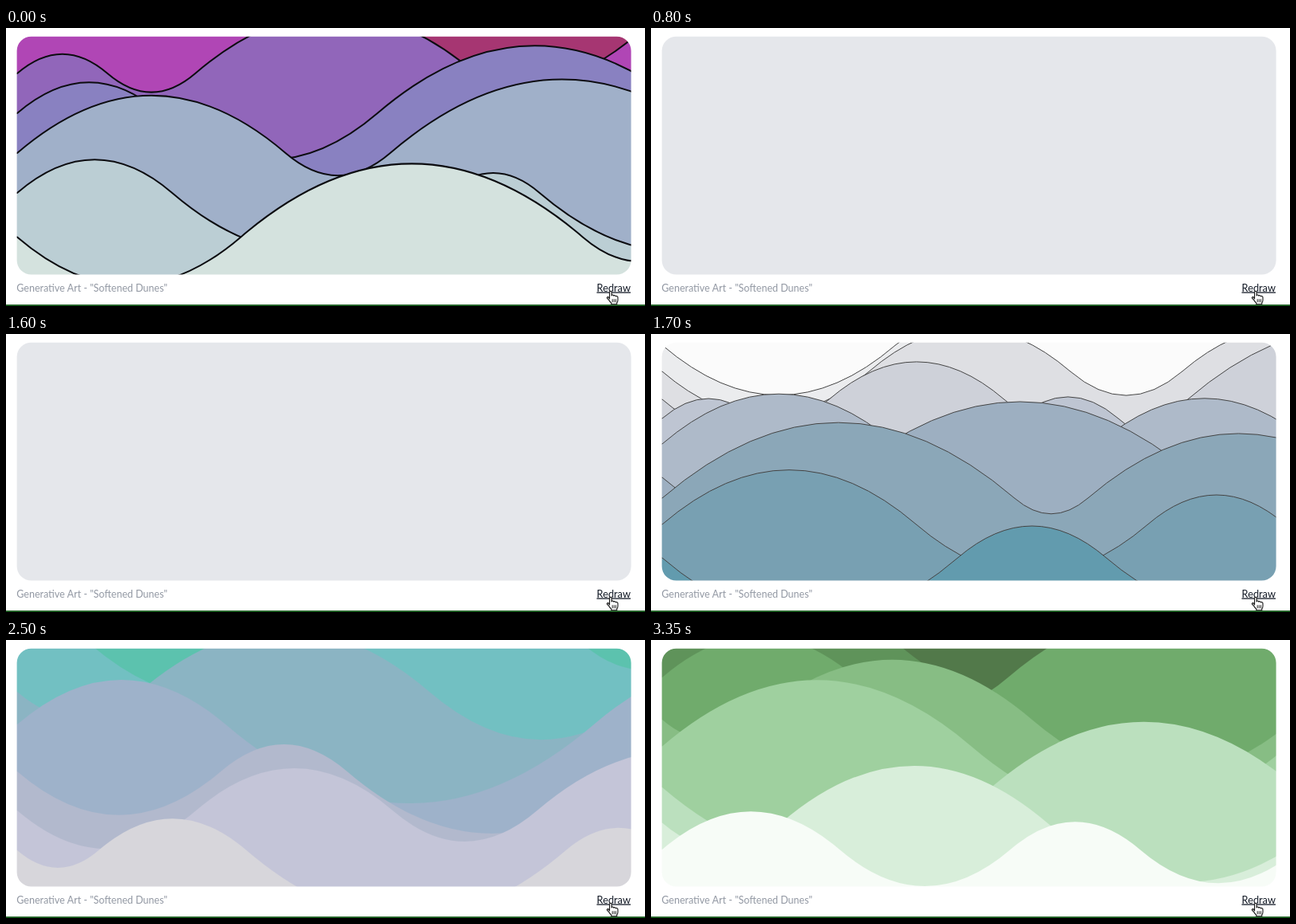
An HTML page for the animation above (3.55 s loop, 800 px wide and 349 px high).

```html
<!DOCTYPE html>
<html lang="en">
<head>
<meta charset="utf-8">
<title>Generative waves</title>
<style>
  html, body { margin: 0; width: 100%; height: 100%; overflow: hidden; background: #fff; }
  svg { display: block; width: 800px; height: 349px; }
  text { font: 12.5px Lato, sans-serif; }
  .link { font-size: 12.8px; }
  .scene { visibility: hidden; animation: 3550ms step-end infinite; }
  #violet { animation-name: violet; }
  #stone { animation-name: stone; }
  #ocean { animation-name: ocean; }
  #mint { animation-name: mint; }
  #forest { animation-name: forest; }
  @keyframes violet { 0% { visibility: visible } 22.535%, 100% { visibility: hidden } }
  @keyframes stone { 0% { visibility: hidden } 23.943% { visibility: visible } 45.07%, 100% { visibility: hidden } }
  @keyframes ocean { 0% { visibility: hidden } 46.478% { visibility: visible } 69.014%, 100% { visibility: hidden } }
  @keyframes mint { 0% { visibility: hidden } 70.422% { visibility: visible } 91.549%, 100% { visibility: hidden } }
  @keyframes forest { 0% { visibility: hidden } 92.957%, 100% { visibility: visible } }
</style>
</head>
<body>
<svg viewBox="0 0 800 349">
  <g id="art"><rect width="800" height="349" fill="#e5e7eb"/></g>
  <!-- White mat with a rounded window, so the card edge stays clean. -->
  <path fill="#fff" fill-rule="evenodd" d="M-1-1H801V350H-1Z
    M31.6 10.7H764.6a18 18 0 0 1 18 18V291.5a18 18 0 0 1-18 18H31.6a18 18 0 0 1-18-18V28.7a18 18 0 0 1 18-18Z"/>
  <text x="13.3" y="330.5" fill="#9298a3">Generative Art - "Softened Dunes"</text>
  <text class="link" x="782" y="330.5" text-anchor="end" fill="#161d29" text-decoration="underline">Redraw</text>
  <rect y="347.2" width="800" height="1.8" fill="#14591a"/>
  <g transform="translate(752 329.5)" stroke="#111" stroke-linejoin="round" stroke-linecap="round">
    <path d="M3.6 10.5V2.2Q3.6 .7 4.8 .7T6.2 2.2V6.4Q6.5 5.4 7.6 5.5T8.8 6.8Q9.2 6 10.2 6.2T11.4 7.5Q12 6.8 13 7.2T14 8.8V12Q14 14.2 12.8 15.3V17.3H5.8V15.7Q3.6 13.7 2.6 11.8L.6 9.6Q.2 8.6 1.1 8.2T2.7 9Z" fill="#fff" stroke-width="1.1"/>
    <path d="M7.2 11.2v3.3M9.3 11.2v3.3M11.4 11.2v3.3" fill="none" stroke-width=".9"/>
  </g>
</svg>
<script>
const NS = 'http://www.w3.org/2000/svg';
const SLOPE = 0.86, LEFT = 14, UP = -1, DOWN = 1;

function add(parent, tag, attrs) {
  const node = document.createElementNS(NS, tag);
  for (const key in attrs) node.setAttribute(key, attrs[key]);
  return parent.appendChild(node);
}

// Parabolic arcs between baseline crossings, alternating crest and trough.
function wave(fill, base, direction, ...crossings) {
  let d = `M0 400V${base}H${LEFT}`, x = LEFT;
  for (const next of crossings) {
    const control = base + direction * SLOPE * (next - x) / 2;
    d += `Q${(x + next) / 2} ${control} ${next} ${base}`;
    x = next;
    direction = -direction;
  }
  return { fill, d: d + 'V400Z' };
}

function scene(id, background, stroke, width, ...waves) {
  const group = add(document.getElementById('art'), 'g',
    { id, class: 'scene', stroke, 'stroke-width': width });
  add(group, 'rect', { x: -9, y: -9, width: 820, height: 420, fill: background });
  waves.forEach(w => add(group, 'path', w));
}

scene('violet', '#a63672', '#0c0c10', 2,
  wave('#b046b5', 8, UP, 500, 790),
  wave('#9166ba', 57, UP, 127, 237, 588, 830),
  wave('#8981c1', 107, UP, 194, 465, 859),
  wave('#a0b0c9', 157, UP, 350, 481, 911),
  wave('#bbced4', 207, UP, 208, 552, 668, 1009),
  wave('#d4e2de', 262.4, DOWN, 294, 722, 865));

scene('stone', '#f5f4ee', '#555', 1,
  wave('#e2e7da', 0, UP, 211, 561, 960),
  wave('#ccdcd0', 65, DOWN, 413, 756, 950),
  wave('#c1cccc', 106, UP, 438, 690, 768, 900),
  wave('#b4b6c2', 164, DOWN, 279, 549, 724, 840),
  wave('#ada9af', 206, UP, 82, 478, 674, 1042),
  wave('#9f9f9f', 255.5, UP, 220, 358, 696, 894));

scene('ocean', '#fbfbfb', '#444', 1,
  wave('#ebecee', 14, DOWN, 306, 440, 760, 960),
  wave('#dedfe3', 47, DOWN, 273, 525, 665, 917),
  wave('#ced1d9', 82, DOWN, 223, 442, 672, 1095),
  wave('#bec5d2', 106, UP, 130, 459, 585, 900),
  wave('#aebac9', 138, UP, 306, 560, 826),
  wave('#9dafc1', 180, DOWN, 241, 683, 900),
  wave('#8ba7b8', 206, UP, 455, 547, 924),
  wave('#78a0b2', 239, UP, 332, 622, 794),
  wave('#629bae', 281, DOWN, 384, 570, 870));

scene('mint', '#5cc2ae', 'none', 0,
  wave('#72c0c2', 5, UP, 105, 418, 722, 872),
  wave('#8bb4c3', 65, DOWN, 167, 530, 810),
  wave('#9eb2ca', 106, UP, 275, 736, 1100),
  wave('#b2b9cd', 165, DOWN, 269, 427, 790),
  wave('#c4c5d8', 214, DOWN, 238, 484, 665, 1012),
  wave('#d7d6db', 264, DOWN, 116, 301, 701, 832));

scene('forest', '#52794a', 'none', 0,
  wave('#5f935a', 5, UP, 309, 640, 960),
  wave('#70ab6c', 47, UP, 256, 447, 818),
  wave('#87bd84', 100, DOWN, 127, 477, 805),
  wave('#9fd09f', 133.5, UP, 401, 797),
  wave('#bbe0be', 185, DOWN, 426, 808),
  wave('#d8eeda', 229.5, DOWN, 163, 496, 842),
  wave('#f7fcf7', 263, UP, 236, 450, 612, 809));
</script>
</body>
</html>
```
